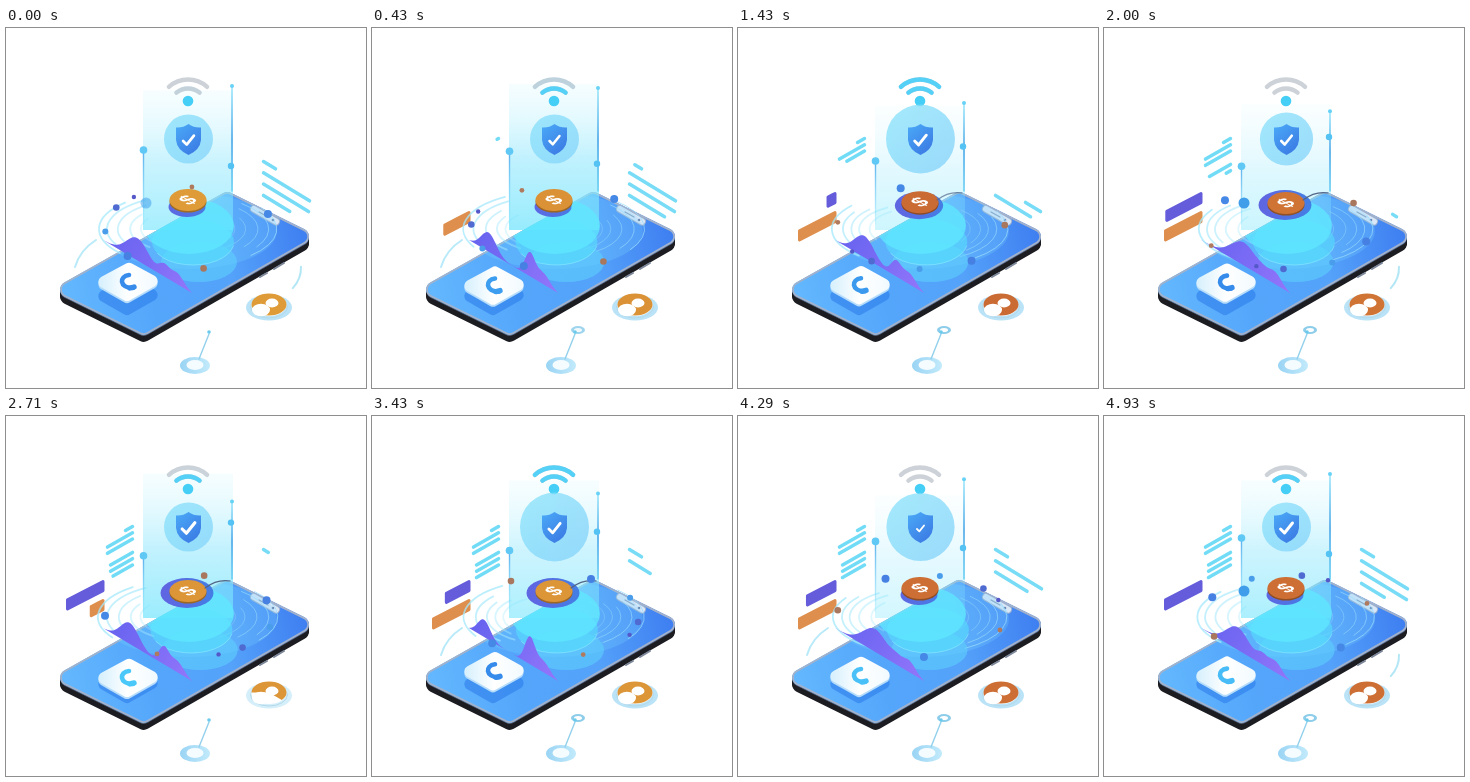
Write an HTML page with a canvas that moves like this. It is 360 px wide and 360 px high and loops after 5000 ms.

```html
<!DOCTYPE html>
<html lang="en">
<head>
<meta charset="utf-8">
<title>Mobile payment</title>
<style>
html, body { margin: 0; width: 100%; height: 100%; overflow: hidden; background: #fff; }
canvas { display: block; width: 360px; height: 360px; }
</style>
</head>
<body>
<canvas id="stage"></canvas>
<script>
const canvas = document.getElementById('stage');
const ctx = canvas.getContext('2d');
const dpr = window.devicePixelRatio || 1;
canvas.width = canvas.height = 360 * dpr;

const LOOP = 5000, STEPS = 70, TAU = Math.PI * 2;
const BOB = 25.7, PULSE = 35, SIGNAL = 33.3;
let n = 0; // current step of the loop

const clamp = v => Math.max(0, Math.min(1, v));
const ramp = (from, to, v) => clamp((v - from) / (to - from));
const smooth = (from, to, v) => { const p = ramp(from, to, v); return p * p * (3 - 2 * p); };
const mix = (a, b, p) => a + (b - a) * p;
const easeOut = p => Math.sin(p * Math.PI / 2);
const cycle = (period, offset = 0) => (n / period + offset) % 1;
const swing = (period, peak = 0) => Math.cos(TAU * (n - peak) / period);

function alpha(a, draw) {
  if (a <= 0) return;
  ctx.save();
  ctx.globalAlpha = Math.min(1, a);
  draw();
  ctx.restore();
}
function oval(x, y, rx, ry, fill) {
  ctx.beginPath();
  ctx.ellipse(x, y, rx, ry, 0, 0, TAU);
  ctx.fillStyle = fill;
  ctx.fill();
}
function dot(x, y, r, fill) { oval(x, y, r, r, fill); }
function stroke(color, width) {
  ctx.strokeStyle = color;
  ctx.lineWidth = width;
  ctx.lineCap = ctx.lineJoin = 'round';
  ctx.stroke();
}
function line(x1, y1, x2, y2, color, width) {
  ctx.beginPath();
  ctx.moveTo(x1, y1);
  ctx.lineTo(x2, y2);
  stroke(color, width);
}
function arc(x, y, rx, ry, from, to, color, width) {
  ctx.beginPath();
  ctx.ellipse(x, y, rx, ry, 0, from * TAU / 360, to * TAU / 360);
  stroke(color, width);
}
function poly(pts, r, dy = 0) {
  const a = pts[0], z = pts[pts.length - 1];
  ctx.beginPath();
  ctx.moveTo((a[0] + z[0]) / 2, (a[1] + z[1]) / 2 + dy);
  pts.forEach((p, i) => {
    const q = pts[(i + 1) % pts.length];
    ctx.arcTo(p[0], p[1] + dy, (p[0] + q[0]) / 2, (p[1] + q[1]) / 2 + dy, r);
  });
  ctx.closePath();
}
function fillPoly(pts, r, dy, fill) {
  poly(pts, r, dy);
  ctx.fillStyle = fill;
  ctx.fill();
}
function fade(x1, y1, x2, y2, ...colors) {
  const g = ctx.createLinearGradient(x1, y1, x2, y2);
  colors.forEach((c, i) => g.addColorStop(i / (colors.length - 1), c));
  return g;
}

const FACE = [[45, 262], [221, 163], [312, 208], [138, 308]];

function onFace(draw) {
  ctx.save();
  poly(FACE, 8);
  ctx.clip();
  draw();
  ctx.restore();
}

function phone() {
  for (let d = 7; d > 0; d--) fillPoly(FACE, 8, d, d > 1 ? '#1c1d22' : '#59647a');
  fillPoly(FACE, 8, 0, fade(60, 260, 300, 205, '#62b7fe', '#54a6fb', '#54a2fa', '#3f7ff1'));
  onFace(() => {
    poly(FACE, 8);
    stroke('#a3b2ca', 3.5);
  });
  line(248, 181, 270, 193.5, '#9fb2d0', 8);
  line(248, 181, 270, 193.5, '#d9e7f7', 6);
  line(253, 184, 262, 189, '#8da0bc', 1.3);
  dot(267, 192, 1.3, '#6d86ad');
  line(254, 249, 261, 245, '#7c8799', 2);
  line(268, 241, 278, 235, '#7c8799', 2);
}

function rings() {
  onFace(() => oval(183, 203, 88, 38, 'rgba(120,210,255,.25)'));
  for (let i = 0; i < 5; i++) {
    const spin = TAU * (n / PULSE + i / 5);
    const rx = 89 - i * 10 + 2 * Math.sin(spin);
    const turn = 14 * Math.sin(spin);
    alpha(.75 - i * .1, () => {
      arc(182, 201, rx, rx * .42, 140 + turn, 225 + turn, '#a5e8fc', 1.8);
      arc(182, 201, rx, rx * .42, -35 - turn, 45 - turn, '#9adcfd', 1);
    });
  }
}

function hologram() {
  const beat = swing(PULSE, 6);
  const top = 68 - 12 * beat;
  alpha(.65 + .27 * beat, () => {
    ctx.fillStyle = fade(0, top, 0, 205, 'rgba(215,248,255,.25)', 'rgba(150,232,253,.65)', 'rgba(110,228,253,.8)');
    ctx.fillRect(137, top, 90, 140 - top + 62);
  });
  onFace(() => {
    const sway = 3 * Math.sin(TAU * n / PULSE);
    oval(193 + sway / 2, 234, 38, 20, 'rgba(95,212,253,.55)');
    oval(187 - sway, 214, 41, 23, 'rgba(85,222,254,.6)');
    oval(183, 198, 45, 28, 'rgba(95,233,255,.75)');
    arc(187 - sway, 214, 41, 23, 10, 150, 'rgba(140,236,255,.6)', 1);
  });

  const drift = swing(STEPS);
  const left = 131 - 9 * drift, right = 72 - 14 * drift;
  line(137.5, left, 137.5, 196, fade(0, left, 0, 200, '#5ab0ee', 'rgba(120,220,250,.1)'), 1.4);
  line(226, right, 226, 163, fade(0, right, 0, 165, '#9ee8fb', '#4aa6e8', '#6fd2f4'), 1.6);
  dot(137.5, left, 3.8, '#5fc8f5');
  dot(226, right, 2, '#68d2f6');
  dot(225, 122 + 16 * drift, 3.2, '#55c2f4');
  alpha(smooth(.65, .85, swing(PULSE, 31)), () => dot(140, 175, 5.5, '#3f9dea'));
}

function wifi() {
  const p = cycle(SIGNAL, .23);
  const off = 1 - smooth(.85, .95, p);
  for (let i = 0; i < 2; i++) {
    const rx = 17 + 11 * i, y = 76 + 3 * i, ry = 15.5 + 12 * i;
    const on = off * (i ? smooth(.35, .62, p) : smooth(.22, .28, p));
    arc(182, y, rx, ry, 227, 313, '#cdd2d9', 4.4);
    alpha(on, () => arc(182, y, rx, ry, 227, 313, '#55d0f6', 4.4));
  }
  dot(182, 73, 5.3, '#45cff6');
}

function shield() {
  const r = 24.5 + 10 * smooth(.3, .75, .5 - .5 * swing(PULSE, 1));
  dot(182.5, 111, r, fade(150, 80, 215, 145, 'rgba(130,225,250,.72)', 'rgba(135,210,250,.8)'));
  ctx.beginPath();
  ctx.moveTo(182.5, 96);
  ctx.quadraticCurveTo(188, 100, 195, 99.5);
  ctx.lineTo(195, 112);
  ctx.quadraticCurveTo(194, 122, 182.5, 127);
  ctx.quadraticCurveTo(171, 122, 170, 112);
  ctx.lineTo(170, 99.5);
  ctx.quadraticCurveTo(177, 100, 182.5, 96);
  ctx.fillStyle = fade(170, 97, 195, 126, '#4aa9f7', '#3a76e2');
  ctx.fill();
  const q = cycle(BOB, .73);
  const s = ramp(0, .12, q) * (1.12 - .3 * q);
  ctx.beginPath();
  ctx.moveTo(182.5 - 6 * s, 113);
  ctx.lineTo(182.5 - 2 * s, 113 + 4 * s);
  ctx.lineTo(182.5 + 6 * s, 113 - 6 * s);
  stroke('#fff', 3 * s);
}

const bump = (x, center, width) => Math.exp(-(((x - center) / width) ** 2));

function wave() {
  const c = swing(PULSE, 11);
  ctx.beginPath();
  ctx.moveTo(97, 212);
  for (let x = 97; x <= 186; x++) {
    const u = (x - 97) / 89;
    const h = 23 * bump(x, 125 - 15 * c, 14 - 5 * c)
      + (16 + 13 * c) * bump(x, 158, 7)
      + 15 * bump(x, 172, 10);
    ctx.lineTo(x, 212 + 53 * u - h * Math.sin(Math.PI * u) ** .4);
  }
  ctx.lineTo(186, 265);
  ctx.closePath();
  ctx.fillStyle = fade(97, 205, 186, 262, '#6462ee', '#7a6bf5', '#9376fa');
  ctx.fill();
}

function tile() {
  const lift = swing(BOB);
  const y = 258 - 4 * lift;
  const diamond = [[86, 0], [123, -20], [158, -1], [121, 20]];
  fillPoly(diamond, 6, 268, 'rgba(45,125,235,.6)');
  fillPoly(diamond, 6, y + 2, '#b5dcfb');
  fillPoly(diamond, 6, y, fade(95, y, 150, y, '#d9f1fd', '#fff', '#f2faff'));
  const blue = smooth(-.8, .6, lift);
  const color = `rgb(${mix(75, 55, blue)},${mix(200, 140, blue)},${mix(250, 235, blue)})`;
  ctx.beginPath();
  ctx.moveTo(123, y - 7);
  ctx.bezierCurveTo(113, y - 6, 113, y + 6, 127, y + 6);
  stroke(color, 4.6);
  line(124, y + 6, 128, y + 5, color, 5.4);
}

function gold(shade = 1) {
  const p = .5 + .5 * swing(43);
  return `rgb(${mix(203, 222, p) * shade},${mix(106, 155, p) * shade},${mix(52, 55, p) * shade})`;
}

function coin() {
  const wide = smooth(11, 25, n) * (1 - smooth(50, 59, n));
  const y = 172 + 3 * wide;
  const rx = 18.5 + 8 * wide, ry = 10 + 5 * wide, base = 179 - 2 * wide;
  oval(181, base, rx, ry, fade(160, 0, 205, 0, '#5f66e2', '#447ee4'));
  oval(182, y + 2, 18.5, 10.5, gold(.7));
  oval(182, y, 18.5, 11, gold());
  ctx.save();
  ctx.translate(182, y);
  ctx.transform(.75, -.4, .75, .42, 0, 0);
  ctx.font = 'bold 23px "Liberation Sans", sans-serif';
  ctx.textAlign = 'center';
  ctx.textBaseline = 'middle';
  ctx.fillStyle = '#fff';
  ctx.fillText('$', 0, 1);
  ctx.restore();
  alpha(wide, () => {
    ctx.beginPath();
    ctx.moveTo(199, 172);
    ctx.quadraticCurveTo(211, 163, 224, 165);
    stroke('#526587', 1.2);
  });
}

// Grows, holds and shrinks once per pulse, from `start` on.
function slab(y, start, color) {
  const p = n < start ? 0 : (n - start) % PULSE;
  const grow = easeOut(ramp(0, 12, p)) * (1 - ramp(28, 34, p));
  if (grow < .02) return;
  const x = 98.5 - 38.5 * grow, low = y + 20 * grow;
  fillPoly([[98.5, y], [98.5, y + 12.5], [x, low + 12.5], [x, low]], 1.5, 0, color);
}

// Shows a text line between the shares `from` and `to` of its length.
function textLine(x, y, dx, dy, from, to, color) {
  if (to - from < .01) return;
  line(x + dx * from, y + dy * from, x + dx * to, y + dy * to, color, 3.5);
}

function panels() {
  slab(163, 18, '#645cda');
  slab(182, 0, '#de8f4e');

  for (let i = 0; i < 6; i++) {
    const y = 110.5 + i * 6.3 + (i > 2 ? 7 : 0);
    const dx = i ? (i > 2 ? -22 : -25) : -7;
    const start = 5 + i * 5.5;
    textLine(126.5, y, dx, -dx * .57, 0, easeOut(ramp(start, start + 8, n)), '#72dcf7');
  }

  [12, 46, 45, 35].forEach((dx, i) => {
    const written = n < 33 ? n + STEPS : n, start = 34 + i * 9.5;
    const erased = n < 33 ? ramp(2 + i * 6, 11 + i * 6, n) : 0;
    textLine(257.5, 133.5 + i * 11.3, dx, dx * .61, erased, ramp(start, start + 10, written), '#78dcf7');
  });
}

function pie() {
  const p = cycle(BOB);
  const full = p < .46 ? 1 : ramp(.46, .49, p);
  alpha(full * .9, () => oval(263, 279.5, 23, 13, '#b3e0f7'));
  arc(263, 279, 18.5, 11, 0, 360, '#b4d9ea', 1);
  oval(263, 277, 17.5, 11, '#fff');
  ctx.beginPath();
  ctx.moveTo(263, 276.5);
  ctx.ellipse(263, 276.5, 17.5, 11, 0, TAU / 2, TAU / 2 + TAU * full);
  ctx.closePath();
  ctx.fillStyle = gold();
  ctx.fill();
  oval(266, 275, 6.5, 4.4, '#fff');
  oval(255, 282, 9, 6.2, '#fff');
}

function nodes() {
  oval(189, 337.5, 15, 8.5, fade(174, 0, 204, 0, '#9ad4f4', '#c2eafb'));
  oval(189, 337, 8.5, 5, '#f5fcff');
  line(193, 331, 203, 306, '#93d0ec', 1.4);
  alpha(1 - smooth(.4, 1, swing(38)), () => {
    oval(206, 302, 7, 4, '#8dcdea');
    oval(206, 302, 4, 2, '#fff');
  });
  dot(203, 304, 1.8, '#6ccbec');
}

function trails() {
  alpha(smooth(0, .5, swing(48, 6)), () => {
    ctx.beginPath();
    ctx.moveTo(69, 239);
    ctx.quadraticCurveTo(74, 222, 90, 212);
    stroke('#b9eaf9', 2);
  });
  alpha(smooth(.55, .7, swing(PULSE, 32)), () => arc(247, 240, 48, 36, -2, 34, '#b4e7f6', 2));
}

// Particles share one orbit: start angle, radius, colour.
const PARTICLES = [
  [80, 3.3, '#a9765e'], [-88, 2.4, '#b07a5e'],
  [-150, 3.3, '#4f6bd2'], [-131, 2.2, '#5558c8'],
  [175, 3, '#4a9dea'], [-20, 4, '#4688e6'], [137, 4, '#4680e2']
];

function particles() {
  for (const [start, r, color] of PARTICLES) {
    const a = (start - 4.2 * n) * TAU / 360;
    dot(183 + 84 * Math.cos(a), 200 + 41 * Math.sin(a), r, color);
  }
}

const PARTS = [trails, panels, phone, rings, hologram, wifi, shield, wave, tile, coin, pie, nodes, particles];

function draw() {
  const t = performance.now() % LOOP;
  // Steps begin on whole hundredths of a second.
  n = Math.min(STEPS - 1, Math.ceil((Math.floor(t / 10) + .5) * STEPS / 500) - 1);
  ctx.setTransform(dpr, 0, 0, dpr, 0, 0);
  ctx.fillStyle = '#fff';
  ctx.fillRect(0, 0, 360, 360);
  PARTS.forEach(part => part());
  requestAnimationFrame(draw);
}
draw();
</script>
</body>
</html>
```
